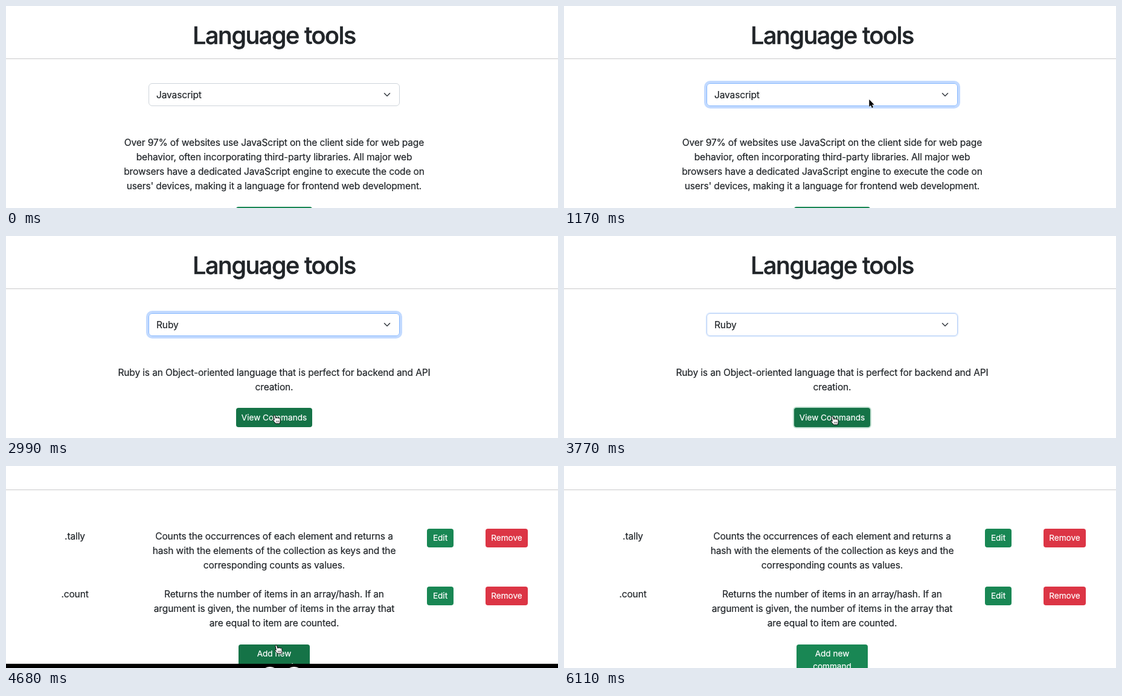
Write an HTML page that moves like this. It is 914 px wide and 335 px high and loops after 6500 ms.

```html
<!DOCTYPE html>
<html lang="en">
<head>
<meta charset="utf-8">
<title>Language tools</title>
<style>
  html, body { margin: 0; width: 100%; height: 100%; overflow: hidden; background: #fff; }
  #stage {
    position: relative; width: 914px; height: 335px; overflow: hidden; background: #fff;
    color: #212529; text-align: center; white-space: nowrap;
    font: 400 15.5px/24px Inter, "Liberation Sans", sans-serif;
    letter-spacing: -.13px; font-optical-sizing: none;
    -webkit-text-stroke: .22px currentColor;
  }
  #stage * { box-sizing: border-box; }
  .page, .page > *, #pointer, #pointer svg { position: absolute; }
  .page { inset: 0; }

  /* One step is 130 ms, or 2% of the loop */
  .page, .lang, .select, .btn, .bar, #pointer, #pointer svg {
    animation: 6.5s step-end infinite;
  }

  h1 {
    margin: 0; left: 0; width: 888px; top: 25px;
    font-size: 39.5px; font-weight: 500; line-height: 48px; letter-spacing: -1.4px;
    -webkit-text-stroke-width: .6px;
  }
  hr { margin: 0; left: 0; width: 100%; height: 1px; border: 0; background: #c8c9ca; }
  p { margin: 0; }

  .select {
    left: 236px; top: 128px; width: 416px; height: 38px;
    border: 1px solid #ced4da; border-radius: 6px; text-align: left;
    animation-name: focus;
  }
  .select span { position: absolute; left: 12px; top: 6.5px; }
  .select svg { position: absolute; right: 12px; top: 12px; }
  .about { left: 144px; top: 214.5px; width: 600px; }

  .btn {
    display: inline-block; padding: 5px 0; border-radius: 4px;
    background: #198754; color: #fff; font-size: 13.6px; line-height: 21px; letter-spacing: 0;
  }
  .red { background: #dc3545; }
  .view { width: 126px; height: 32px; padding-top: 6px; margin-top: 22.5px; }
  .ruby .view { animation-name: press; }
  .edit { left: 697px; width: 44px; }
  .remove { left: 794px; width: 70px; }
  .add { left: 385px; top: 296px; width: 118px; height: 52px; animation-name: hover; }
  .name { left: 14px; width: 200px; }
  .desc { left: 194px; width: 500px; }

  .bar {
    left: 0; top: 328px; width: 914px; height: 7px; overflow: hidden; background: #000;
    animation-name: bar;
  }
  .bar i {
    position: absolute; top: 4.5px; width: 32px; height: 32px;
    border-radius: 50%; background: #fff;
  }

  .tools { animation-name: first; }
  .commands { animation-name: second; }
  .js { animation-name: js; }
  .ruby { animation-name: ruby; }
  #pointer { left: 0; top: 0; animation-name: move; }
  #pointer svg { overflow: visible; }
  #pointer .arrow { animation-name: arrow; }
  #pointer .hand { animation-name: hand; }

  @keyframes first { 0% { opacity: 1 } 62%, 100% { opacity: 0 } }
  @keyframes second { 0% { opacity: 0 } 62%, 100% { opacity: 1 } }
  @keyframes js { 0% { opacity: 1 } 36%, 100% { opacity: 0 } }
  @keyframes ruby { 0% { opacity: 0 } 36%, 100% { opacity: 1 } }
  @keyframes arrow { 0% { opacity: 1 } 44%, 100% { opacity: 0 } }
  @keyframes hand { 0% { opacity: 0 } 44%, 100% { opacity: 1 } }
  @keyframes bar { 0% { opacity: 1 } 92%, 100% { opacity: 0 } }
  @keyframes hover { 0% { background: #157347 } 92%, 100% { background: #198754 } }
  @keyframes focus {
    0% { border-color: #ced4da; box-shadow: none }
    14% { border-color: #a5c5ef; box-shadow: 0 0 0 2px #0d6efd22 }
    16% { border-color: #86b7fe; box-shadow: 0 0 0 4px #0d6efd40 }
    58% { border-color: #b3cdf5; box-shadow: 0 0 0 1.5px #0d6efd1c }
    60%, 100% { border-color: #ced4da; box-shadow: none }
  }
  @keyframes press {
    0% { background: #198754; box-shadow: none }
    44% { background: #157347; box-shadow: none }
    58% { background: #157347; box-shadow: 0 0 0 2px #3c996e50 }
    60%, 100% { background: #157347; box-shadow: 0 0 0 4px #3c996e80 }
  }
  @keyframes move {
    0% { transform: translate(480px, 340px) }
    2% { transform: translate(483px, 322px) }
    4% { transform: translate(488px, 282px) }
    6% { transform: translate(495px, 232px) }
    8% { transform: translate(501px, 188px) }
    10% { transform: translate(504px, 163px) }
    12% { transform: translate(505px, 155px) }
    36% { transform: translate(423px, 163px) }
    38% { transform: translate(427px, 195px) }
    40% { transform: translate(434px, 240px) }
    42% { transform: translate(441px, 274px) }
    44% { transform: translate(444px, 291px) }
    46% { transform: translate(445px, 297px) }
    48% { transform: translate(445px, 299px) }
    72% { transform: translate(448px, 297px) }
    74% { transform: translate(450px, 298px) }
    76% { transform: translate(453px, 301px) }
    78% { transform: translate(457px, 304px) }
    80% { transform: translate(460px, 307px) }
    82% { transform: translate(462px, 308px) }
    84% { transform: translate(463px, 309px) }
    86% { transform: translate(465px, 315px) }
    88% { transform: translate(467px, 323px) }
    90% { transform: translate(468px, 332px) }
    92%, 100% { transform: translate(470px, 345px) }
  }
</style>
</head>
<body>
<div id="stage">
  <div class="page tools">
    <h1>Language tools</h1>
    <hr style="top:87px">
    <div class="select">
      <span class="lang js">Javascript</span><span class="lang ruby">Ruby</span>
      <svg width="16" height="12" viewBox="0 0 16 16" fill="none" stroke="#343a40" stroke-width="2" stroke-linecap="round" stroke-linejoin="round"><path d="M2 5l6 6 6-6"/></svg>
    </div>
    <div class="about lang js">
      <p>Over 97% of websites use JavaScript on the client side for web page<br>
      behavior, often incorporating third-party libraries. All major web<br>
      browsers have a dedicated JavaScript engine to execute the code on<br>
      users' devices, making it a language for frontend web development.</p>
      <div class="btn view">View Commands</div>
    </div>
    <div class="about lang ruby">
      <p>Ruby is an Object-oriented language that is perfect for backend and API<br>
      creation.</p>
      <div class="btn view">View Commands</div>
    </div>
  </div>

  <div class="page commands">
    <hr style="top:39px">
    <p class="name" style="top:104.5px">.tally</p>
    <p class="desc" style="top:104.5px">Counts the occurrences of each element and returns a<br>
      hash with the elements of the collection as keys and the<br>
      corresponding counts as values.</p>
    <div class="btn edit" style="top:104px">Edit</div>
    <div class="btn red remove" style="top:104px">Remove</div>
    <p class="name" style="top:200.5px">.count</p>
    <p class="desc" style="top:200.5px">Returns the number of items in an array/hash. If an<br>
      argument is given, the number of items in the array that<br>
      are equal to item are counted.</p>
    <div class="btn edit" style="top:200px">Edit</div>
    <div class="btn red remove" style="top:200px">Remove</div>
    <div class="btn add">Add new<br>command</div>
    <div class="bar"><i style="left:421px"></i><i style="left:461px"></i></div>
  </div>

  <div id="pointer">
    <svg class="arrow" width="10" height="15"><path d="M.3 0v12l2.7-2.5 1.9 4.4 2-.9-1.9-4.2h3.7z" fill="#000" stroke="#fff" paint-order="stroke"/></svg>
    <svg class="hand" width="14" height="15"><path d="M-.6 8.4L-2 1.6A1.2 1.2 0 0 1 .5 1L1.8 5.3A1.1 1.1 0 0 1 4 5.2 1.1 1.1 0 0 1 6.4 5.6 1.1 1.1 0 0 1 8.7 6.4C9.6 9 9 10.5 8.3 14H1.4C.5 12-1.5 10.8-2.7 9-3.3 7.6-1.6 7.3-.6 8.4z" fill="#fff" stroke="#000" stroke-linejoin="round"/><path d="M2.7 9.2v2.6M4.7 9.2v2.6M6.6 9.2v2.6" stroke="#000" stroke-width=".7"/></svg>
  </div>
</div>
</body>
</html>
```
